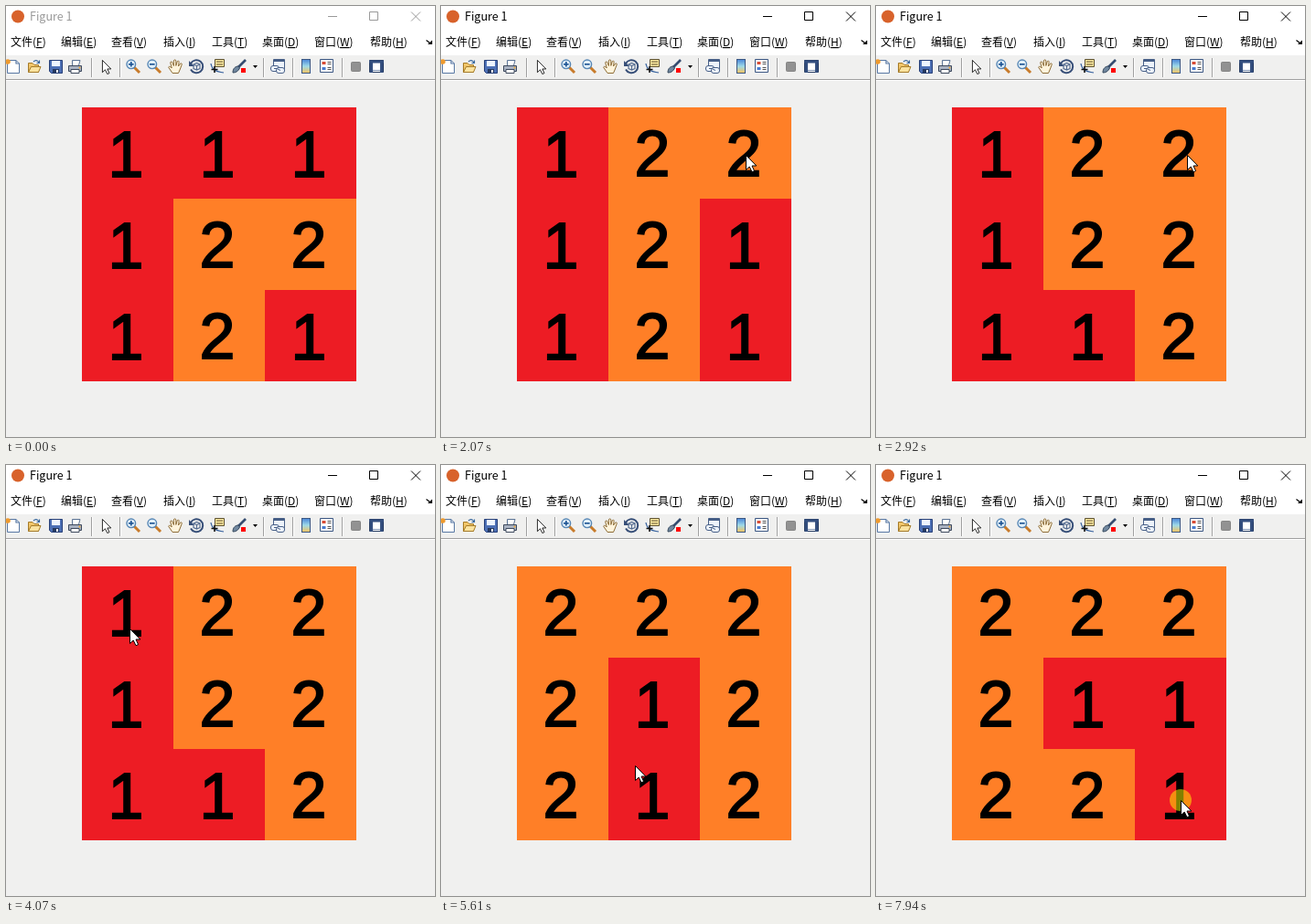
Animation, 469 px wide and 472 px high, one loop 8 s. Source, as an HTML page:

```html
<!DOCTYPE html>
<html lang="zh-CN">
<head>
<meta charset="utf-8">
<style>
html, body { margin: 0; width: 100%; height: 100%; overflow: hidden; background: #f0f0ef; }
svg { display: block; position: absolute; left: 0; top: 0; }
text { font-family: "Noto Sans CJK SC", "Noto Sans CJK", sans-serif; font-size: 12px; }
#title { font-size: 12.5px; }
.digit { font-family: "Liberation Sans", Arial, sans-serif; font-size: 70px; stroke: #000; stroke-width: 1.8px; }
.line { fill: none; stroke-width: 1.2; }
</style>
</head>
<body>
<svg width="469" height="472" viewBox="0 0 469 472">
  <defs>
    <path id="arrow" d="M.5.5V16.5L4.2 13 7 18.7 9.6 17.6 7 12H11.8Z" fill="#fff" stroke="#000"/>
    <g id="lens">
      <path d="M9 9L15 15" stroke="#c87b2b" stroke-width="3"/>
      <circle cx="5.8" cy="5.8" r="4.8" fill="#e2f1fb" stroke="#5686b5" stroke-width="1.4"/>
      <path d="M3 5.8H8.6" stroke="#174f91" stroke-width="1.6"/>
    </g>
    <path id="dividers" d="M93.5 57V78M124.5 57V78M281.5 57V78M313.5 57V78M367.5 57V78"/>
  </defs>

  <rect width="469" height="472" fill="#f0f0ef"/>
  <rect width="469" height="54" fill="#fff"/>
  <path d="M0 80.5H469" stroke="#a0a0a0"/>
  <path d="M0 81.5H469" stroke="#fff"/>

  <circle cx="13" cy="11.5" r="7" fill="#d8622b"/>
  <text x="26" y="16" id="title">Figure 1</text>
  <path id="buttons" fill="none"
    d="M352 11.5H362M397.5 6.5H406.5V15.5H397.5ZM443 6.5L453 16.5M453 6.5L443 16.5"/>
  <g id="menu"></g>
  <path d="M459.5 37.5L464 41" stroke="#000" stroke-width="1.2"/><path d="M466 37.5V42H461Z"/>

  <use href="#dividers" stroke="#a0a0a0"/>
  <use href="#dividers" x="1" stroke="#fff"/>
  <!-- new, open, save, print -->
  <g transform="translate(0 58)">
    <path d="M1.5 1.5H11L14.5 5V15.5H1.5Z" fill="#fff" stroke="#5777a3"/>
    <path d="M11 1.5V5H14.5" class="line" stroke="#5777a3"/>
    <circle cx="2" cy="3" r="2.8" fill="#ee9a2e"/>
  </g>
  <g transform="translate(23 58)">
    <path d="M1.5 14.5V4.5H6L8 6.5H12.5V14.5Z" fill="#f2c66a" stroke="#a47a27"/>
    <path d="M1.5 14.5L4.5 8.5H15L12.5 14.5Z" fill="#fbe3a0" stroke="#a47a27"/>
    <path d="M7 3C9 1 11 1 13 4M13.5 1.5V4.5H10.5" class="line" stroke="#39689e"/>
  </g>
  <g transform="translate(47 58)">
    <path d="M.5 1.5H14.5V15.5H2.5L.5 13.5Z" fill="#4d70b5" stroke="#263f78"/>
    <path d="M3 2H12V8H3Z" fill="#edf4ff"/><path d="M4 11H11V15H4Z" fill="#25385e"/>
    <path d="M8 12H10V15H8Z" fill="#fff"/>
  </g>
  <g transform="translate(68 58)">
    <path d="M4.5 7V1.5H13L11.5 7" fill="#fff" stroke="#5b7394"/>
    <path d="M.5 7.5H14.5V13.5H.5Z" fill="#a9b2c2" stroke="#3c485c"/>
    <path d="M3 11.5H12V15.5H3Z" fill="#fff" stroke="#3c485c"/>
    <circle cx="12.5" cy="9.5" r="1" fill="#f0a528"/>
  </g>
  <use href="#arrow" transform="translate(105 59) scale(.83)"/>
  <use href="#lens" x="131" y="58"/><path d="M136.8 61V66.6" stroke="#174f91" stroke-width="1.6"/>
  <use href="#lens" x="154" y="58"/>
  <!-- pan, rotate, data tip, brush -->
  <path transform="translate(177 58)" fill="#fff4dc" stroke="#8d6d38"
    d="M5 15.5L.7 9.2C1 7.5 2.8 8.3 4.2 10L2.7 4C3 2.4 4.6 2.8 5.2 4.3L6.3 7.5V2C6.8.5 8.6.6 8.8 2V7.4L10.2 2.8C11 1.5 12.3 2 12.1 3.6L11.5 8 13.7 5C15 4.4 15.8 5.4 15 6.8L13 12 11.5 15.5Z"/>
  <g transform="translate(200 58)">
    <path d="M2 5A7 7 0 1 1 2 11.5" class="line" stroke="#354d77" style="stroke-width:2"/>
    <path d="M0 2V8H6Z" fill="#354d77"/>
    <path d="M5 6L8.5 4.5 12 6V10.5L8.5 12 5 10.5ZM5 6L8.5 7.5 12 6M8.5 7.5V12" class="line" stroke="#566d91"/>
  </g>
  <g transform="translate(223 58)">
    <path d="M5.5.5H15.5V8.5H5.5Z" fill="#ffeaa0" stroke="#5c5030"/>
    <path d="M7 3H14M7 6H14" stroke="#5c5030"/>
    <path d="M1 5C2 12 7 14 15 15" class="line" stroke="#315d9b"/>
    <path d="M5 8V15M1.5 11.5H8.5" stroke="#111" stroke-width="1.6"/>
  </g>
  <g transform="translate(247 58)">
    <path d="M7 9L15 1" stroke="#354c70" stroke-width="2.6"/>
    <path d="M1 15C1 10 4 8 7 8L8.5 10C7 13 5 15 1 15Z" fill="#70879f" stroke="#34475c"/>
    <path d="M10 10H15V15H10Z" fill="#f00"/>
  </g>
  <path d="M270 65H275L272.5 68Z"/>
  <!-- link, colour bar, legend, tools -->
  <g transform="translate(289 58)" fill="#edf3fb" stroke="#475f87">
    <path d="M3.5.5H15.5V11.5H3.5Z"/><path d="M4 2H15" stroke-width="2"/>
    <rect x=".5" y="7.5" width="9" height="6" rx="2.5"/>
    <rect x="6.5" y="9.5" width="9" height="6" rx="2.5"/><path d="M4 10.5H7L11 12.5"/>
  </g>
  <linearGradient id="bar" x2="0" y2="1">
    <stop stop-color="#4a86d8"/><stop offset=".5" stop-color="#9ed9e8"/><stop offset="1" stop-color="#f5c35c"/>
  </linearGradient>
  <rect x="323.5" y="58.5" width="9" height="15" fill="url(#bar)" stroke="#3b5783"/>
  <g transform="translate(343 58)">
    <path d="M.5.5H14.5V14.5H.5Z" fill="#fff" stroke="#3b5783"/>
    <path d="M2.5 3H6.5V6H2.5Z" fill="#d84c36"/><path d="M2.5 9H6.5V12H2.5Z" fill="#477bd1"/>
    <path d="M8.5 3.5H12.5M8.5 5.5H12.5M8.5 9.5H12.5M8.5 11.5H12.5" stroke="#555"/>
  </g>
  <rect x="377.5" y="61.5" width="10" height="10" rx="1" fill="#929292" stroke="#858585"/>
  <g transform="translate(397 59)">
    <path d="M.5.5H15.5V13.5H.5Z" fill="#fff" stroke="#253b61"/>
    <path d="M0 2H16M2.5 2V14M13.5 2V14" stroke="#344f7f" stroke-width="3"/>
    <path d="M4 11.5H12" stroke="#889bb8"/>
  </g>

  <g id="board"></g>
  <circle id="press" r="12" fill="#ff0" fill-opacity=".5"/>
  <use id="cursor" href="#arrow"/>
</svg>

<script>
const LOOP = 8000, STEP = 76.6, CELL = 100, LEFT = 83, TOP = 111;
const START = [1, 1, 1, 1, 2, 2, 1, 2, 1];

// Pointer path: [step, x, y]
const PATH = [
  [3, 385, 456], [6, 259, 137], [8, 259, 137], [18, 359, 307], [20, 359, 307],
  [24, 333, 163], [27, 333, 163], [30, 355, 328], [31, 355, 328], [38, 340, 163],
  [42, 331, 162], [44, 331, 162], [47, 136, 159], [52, 136, 159], [57, 130, 259],
  [60, 130, 259], [63, 128, 273], [73, 212, 329], [74, 268, 351], [77, 331, 366],
  [83, 331, 366], [85, 333, 366], [96, 333, 366], [97, 333, 367], [105, 333, 367]
];
// A press flips its cell and the four neighbours.
const CLICKS = [
  { down: 24, up: 26, row: 0, col: 2 },
  { down: 30, up: 32, row: 2, col: 2 },
  { down: 58, up: 61, row: 1, col: 0 },
  { down: 103, up: 106, row: 2, col: 2 }
];

const $ = id => document.getElementById(id);
function add(parent, tag, attrs, text = "") {
  const node = document.createElementNS("http://www.w3.org/2000/svg", tag);
  for (const key in attrs) node.setAttribute(key, attrs[key]);
  node.textContent = text;
  return parent.appendChild(node);
}

[["文件", "F", 5], ["编辑", "E", 60], ["查看", "V", 115], ["插入", "I", 172],
 ["工具", "T", 225], ["桌面", "D", 280], ["窗口", "W", 337], ["帮助", "H", 398]]
  .forEach(([name, key, x]) => {
    const item = add($("menu"), "text", { x, y: 44 }, name + "(");
    add(item, "tspan", { "text-decoration": "underline" }, key);
    item.append(")");
  });

const cells = START.map((_, i) => {
  const x = LEFT + i % 3 * CELL, y = TOP + Math.floor(i / 3) * CELL;
  return {
    x, y,
    tile: add($("board"), "rect", { x, y, width: CELL, height: CELL }),
    digit: add($("board"), "text", { class: "digit" })
  };
});

function pointerAt(step) {
  const next = PATH.findIndex(p => p[0] > step);
  const [s0, x0, y0] = PATH[next - 1], [s1, x1, y1] = PATH[next];
  const k = (step - s0) / (s1 - s0);
  return [Math.round(x0 + (x1 - x0) * k), Math.round(y0 + (y1 - y0) * k)];
}

function valueAt(i, step) {
  const row = Math.floor(i / 3), col = i % 3;
  const flips = CLICKS.filter(c => step >= c.down &&
    Math.abs(c.row - row) + Math.abs(c.col - col) <= 1).length;
  return flips % 2 ? 3 - START[i] : START[i];
}

function draw(time) {
  const step = Math.floor(time % LOOP / STEP);
  cells.forEach(({ x, y, tile, digit }, i) => {
    const one = valueAt(i, step) === 1;
    tile.setAttribute("fill", one ? "#ed1c24" : "#ff7f27");
    digit.textContent = one ? "1" : "2";
    digit.setAttribute("x", x + (one ? 28.4 : 28.5));
    digit.setAttribute("y", y + (one ? 76.4 : 74.6));
  });

  const active = step >= CLICKS[0].down;
  $("title").setAttribute("fill", active ? "#000" : "#999");
  $("buttons").setAttribute("stroke", active ? "#000" : "#999");

  const visible = step >= PATH[0][0];
  const pressed = CLICKS.some(c => step >= c.down && step < c.up);
  $("cursor").style.display = visible ? "" : "none";
  $("press").style.display = pressed ? "" : "none";
  if (visible) {
    const place = `translate(${pointerAt(step)})`;
    $("cursor").setAttribute("transform", place);
    $("press").setAttribute("transform", place);
  }
}

const begin = performance.now();
function tick() {
  draw(performance.now() - begin);
  requestAnimationFrame(tick);
}
tick();
</script>
</body>
</html>
```
